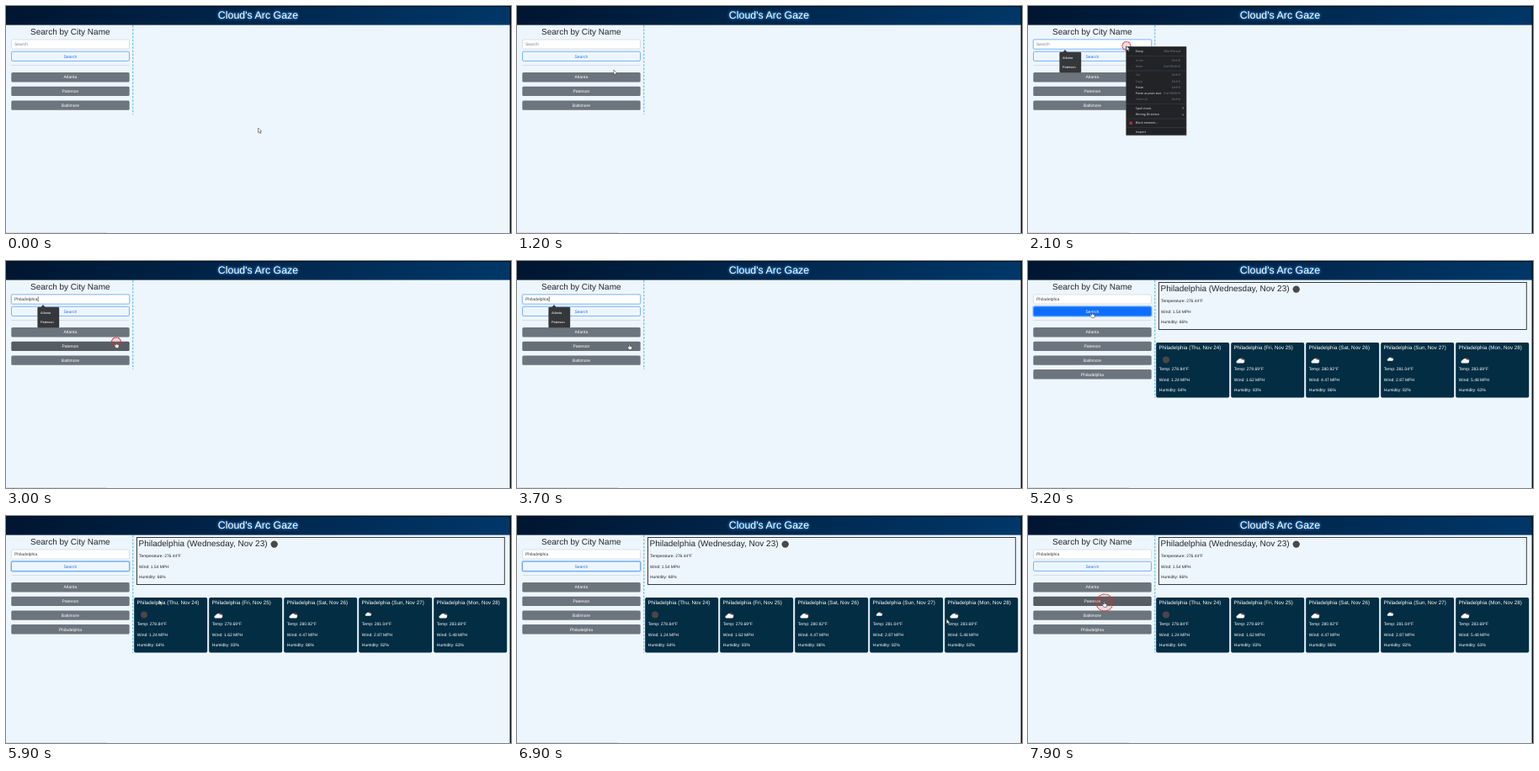
An HTML page for the animation above (8000 ms loop, 600 px wide and 270 px high).

```html
<!DOCTYPE html>
<html lang="en">
<head>
<meta charset="utf-8">
<title>City weather search</title>
<style>
html, body { margin: 0; width: 100%; height: 100%; overflow: hidden; background: #eef6fd; }
svg { display: block; width: 600px; height: 270px; }
text { font-family: "Liberation Sans", Arial, sans-serif; text-rendering: geometricPrecision; white-space: pre; }
#menu text { font-family: "Open Sans", "Noto Sans", sans-serif; }
#title { filter: drop-shadow(0 0 1.5px #2b8fd8) drop-shadow(0 0 1.5px #14589a); }
</style>
</head>
<body>
<svg id="stage" viewBox="0 0 600 270">
  <defs>
    <linearGradient id="bar" x2="1" y2=".04">
      <stop offset="0" stop-color="#001530"/>
      <stop offset=".5" stop-color="#00264c"/>
      <stop offset="1" stop-color="#003767"/>
    </linearGradient>
    <g id="cloud">
      <path d="M-1-1.4a2.4 2.4 0 0 1 4.6-.6a1.8 1.8 0 0 1 1 3.4h-5z" fill="#4a454e"/>
      <path d="M-3.4 3.2a1.6 1.6 0 0 1-.2-3.2a2.9 2.9 0 0 1 5.2-.8a2 2 0 0 1 1.6 4z" fill="#fff"/>
    </g>
  </defs>
</svg>
<script>
const LOOP = 8000, PASTE = 3000, LOADED = 4800;
const stage = document.getElementById('stage');

function add(parent, tag, attrs = {}, content) {
  const node = document.createElementNS('http://www.w3.org/2000/svg', tag);
  for (const k in attrs) node.setAttribute(k, attrs[k]);
  if (content !== undefined) node.textContent = content;
  return parent.appendChild(node);
}
const group = (id, parent = stage) => add(parent, 'g', { id });
const rect = (parent, x, y, width, height, fill, more) =>
  add(parent, 'rect', { x, y, width, height, fill, ...more });
// y is the middle of the capitals
const text = (parent, x, y, size, fill, str, anchor = 'start') =>
  add(parent, 'text', { x, y: y + size * .36, 'font-size': size, fill, 'text-anchor': anchor }, str);
const show = (node, on) => node.setAttribute('display', on ? 'inline' : 'none');

// Page
const page = group('page');
rect(page, 0, 0, 600, 270, '#eef6fd');
rect(page, 0, 0, 600, 22.6, 'url(#bar)');
rect(page, 0, 0, 600, 1, '#00101f');
rect(page, 598.6, 0, 1.4, 270, '#0b1118');
rect(page, 0, 269, 120, 1, '#d9dee3');
text(page, 299.5, 10.6, 12.4, '#fff', "Cloud's Arc Gaze", 'middle').id = 'title';
text(page, 76.3, 30.8, 10, '#212529', 'Search by City Name', 'middle');
const divider = add(page, 'path', { stroke: '#4fb5de', 'stroke-width': 1, 'stroke-dasharray': '2.6 1.6' });

const inputGlow = rect(page, 5.4, 38.9, 142.2, 13.2, '#bcd8fb', { rx: 2.4 });
const input = rect(page, 6.5, 40, 140, 11, '#fff', { rx: 1.5, 'stroke-width': .7 });
const query = text(page, 10, 45.3, 5, '#212529', '');
const caret = rect(page, 37.8, 42.5, .6, 6, '#111');

const buttonGlow = rect(page, 5.2, 52.9, 142.6, 13.8, '#a9cdfb', { rx: 2.6 });
const button = rect(page, 6.5, 54.2, 140, 11.2, '', { rx: 1.5, stroke: '#4a94f7', 'stroke-width': .7 });
const buttonText = text(page, 76.4, 59.7, 5, '', 'Search', 'middle');
rect(page, 6.5, 70.4, 140, .6, '#c6cdd4');

const cities = ['Atlanta', 'Paterson', 'Baltimore', 'Philadelphia'].map((name, i) => {
  const g = group('city' + i), y = 79 + i * 16.7;
  const box = rect(g, 6.3, y, 140.4, 11.4, '#6c757d', { rx: 1.5 });
  text(g, 76.4, y + 5.6, 5, '#fff', name, 'middle');
  return { g, box, y };
});

// Forecast
const results = group('results');
rect(results, 155.5, 25.5, 436.8, 56, 'none', { stroke: '#23282e', 'stroke-width': .9 });
text(results, 157.5, 32.6, 10, '#212529', 'Philadelphia (Wednesday, Nov 23)');
add(results, 'circle', { cx: 318.7, cy: 33.6, r: 4.2, fill: '#48494b' });
['Temperature: 276.44°F', 'Wind: 1.54 MPH', 'Humidity: 66%'].forEach((line, i) =>
  text(results, 158, 47.4 + i * 12.5, 4.9, '#212529', line));

[
  ['Thu, Nov 24', '278.84', '1.24', 64],
  ['Fri, Nov 25', '279.69', '1.62', 83],
  ['Sat, Nov 26', '280.92', '4.47', 86],
  ['Sun, Nov 27', '281.04', '2.87', 82],
  ['Mon, Nov 28', '283.69', '5.48', 63]
].forEach(([day, temp, wind, humidity], i) => {
  const x = 152.2 + i * 89, small = i == 3;
  rect(results, x, 97, 87, 65.6, '#022d43', { rx: 1.8 });
  text(results, x + 3.2, 103.2, 6.25, '#fff', `Philadelphia (${day})`);
  if (i) add(results, 'use', {
    href: '#cloud',
    transform: `translate(${x + 11.4} ${small ? 116.4 : 118.2}) scale(${small ? .75 : 1})`
  });
  else add(results, 'circle', { cx: x + 11.8, cy: 117.5, r: 4, fill: '#4c4548' });
  [`Temp: ${temp}°F`, `Wind: ${wind} MPH`, `Humidity: ${humidity}%`].forEach((line, j) =>
    text(results, x + 3.6, 128.3 + j * 12.6, 5, '#fff', line));
});

// Suggestions
const suggest = group('suggest');
add(suggest, 'path', { d: 'M41 55.5l3-3.5 3 3.5z', fill: '#35383b' });
rect(suggest, 37.4, 54.8, 25.8, 24.4, '#35383b', { rx: 1.2 });
text(suggest, 41, 61.6, 3.9, '#fff', 'Atlanta');
text(suggest, 41, 72.6, 3.9, '#fff', 'Paterson');

const ring = add(stage, 'circle', { fill: '#e0303028', stroke: '#d22f2f', 'stroke-width': 1.1, 'stroke-dasharray': '2 .5' });

// Context menu
const menu = group('menu');
rect(menu, 117.2, 49, 71.6, 105.6, '#00000030');
rect(menu, 116.6, 48.2, 71.4, 105.4, '#212327', { stroke: '#484b4f', 'stroke-width': .4 });
const pasteHover = rect(menu, 116.8, 92.8, 71, 7.2, '#3b3e43');
[
  [54, 'Emoji', 'Win+Period'],
  [64.4, 'Undo', 'Ctrl+Z', 1], [71.4, 'Redo', 'Ctrl+Shift+Z', 1],
  [82.2, 'Cut', 'Ctrl+X', 1], [89.4, 'Copy', 'Ctrl+C', 1], [96.4, 'Paste', 'Ctrl+V'],
  [103.6, 'Paste as plain text', 'Ctrl+Shift+V'], [110.7, 'Select all', 'Ctrl+A', 1],
  [121.3, 'Spell check', '›'], [128.4, 'Writing Direction', '›'],
  [139.2, 'Block element...', ''], [149.8, 'Inspect', '']
].forEach(([y, label, key, off]) => {
  text(menu, 127.8, y, 3.6, off ? '#75787c' : '#f1f1f1', label);
  text(menu, key == '›' ? 185 : 181, y, key == '›' ? 6 : 3.6, key == '›' ? '#eee' : '#8d9094', key, 'end');
});
[59.2, 76.8, 116, 133.8, 144.5].forEach(y => rect(menu, 116.8, y, 71, .4, '#494c50'));
add(menu, 'circle', { cx: 122.2, cy: 139.2, r: 2, fill: '#b52a2a' });

// Pointers, each with its hot spot at 0,0
const pointers = {
  arrow: ['M0 0V5.7L1.4 4.5 2.4 6.6 3.3 6.1 2.4 4.1H4.1Z', '#fff', '#222', .5],
  hand: ['M-.5 .5Q0-.4 .5 .5V2.6L2.8 3.2Q3.4 3.5 3.2 4.4L2.7 6.9H-.4L-2 4.6Q-2-.2-.5 4Z', '#fff', '#222', .5],
  beam: ['M-1-2.8H1M0-2.8V2.8M-1 2.8H1', 'none', '#333', .6]
};
for (const kind in pointers) {
  const [d, fill, stroke, width] = pointers[kind];
  pointers[kind] = add(stage, 'path', { d, fill, stroke, 'stroke-width': width, 'stroke-linejoin': 'round' });
}

// time, x, y
const route = [
  [0, 299.6, 145], [900, 112, 114], [1450, 117, 47.5], [2250, 117, 47.5],
  [2750, 131, 96.5], [3250, 131, 96.5], [3600, 133.5, 98.5], [3850, 133.5, 98.5],
  [4380, 76, 60.5], [5450, 76, 60.5], [5900, 182, 100], [6200, 540, 128],
  [6350, 516, 134], [7200, 508, 118], [7750, 90.5, 101.5], [LOOP, 90.5, 101.5]
];
const clicks = [[1500, 117, 47.5], [1950, 117, 47.5], [2950, 131, 96.5], [4550, 76, 60.5], [7700, 91, 103]];

const clamp = v => Math.max(0, Math.min(1, v));
const mix = (a, b, k) => a + (b - a) * k;
const blend = (a, b, k) => `rgb(${a.map((v, i) => Math.round(mix(v, b[i], k)))})`;

function pointerAt(t) {
  const i = Math.max(1, route.findIndex(p => p[0] >= t));
  const [t0, x0, y0] = route[i - 1], [t1, x1, y1] = route[i];
  const k = clamp((t - t0) / (t1 - t0)), e = k * k * (3 - 2 * k);
  return [mix(x0, x1, e), mix(y0, y1, e)];
}

function draw(t) {
  const [x, y] = pointerAt(t);
  const loaded = t >= LOADED, pasted = t >= PASTE;
  const menuOpen = t >= 2000 && t < PASTE;
  const focused = t >= 1500 && t < 4600;
  const within = (top, height) => x > 6 && x < 147 && y > top && y < top + height;
  const click = clicks.find(c => t >= c[0] && t < c[0] + 300);

  show(results, loaded);
  show(cities[3].g, loaded);
  divider.setAttribute('d', `M150.8 23V${loaded ? 163 : 129}`);

  show(inputGlow, focused);
  input.setAttribute('stroke', focused ? '#7db2fb' : '#ced4da');
  query.textContent = pasted ? 'Philadelphia' : 'Search';
  query.setAttribute('fill', pasted ? '#3a3e42' : '#7b838b');
  show(caret, pasted && focused && (t - 3400) % 1060 < 530);
  show(suggest, t >= 1550 && t < 3900);

  const hover = clamp((t - 4330) / 150) * (1 - clamp((t - 5530) / 150));
  button.setAttribute('fill', blend([238, 246, 253], [13, 110, 253], hover));
  buttonText.setAttribute('fill', blend([40, 120, 240], [255, 255, 255], hover));
  show(buttonGlow, t >= 4600 && t < 7700);

  let overCity = false;
  cities.forEach((c, i) => {
    const over = !menuOpen && (i < 3 || loaded) && within(c.y, 11.4);
    overCity = overCity || over;
    c.box.setAttribute('fill', !over ? '#6c757d' : click ? '#565e64' : '#666f76');
  });

  show(menu, menuOpen);
  show(pasteHover, y > 92.8 && y < 100);

  show(ring, click);
  if (click) {
    const k = (t - click[0]) / 300;
    ring.setAttribute('cx', click[1]);
    ring.setAttribute('cy', click[2]);
    ring.setAttribute('r', click[0] == 1950 ? mix(3, 7, k) : mix(4, 13, k));
    ring.setAttribute('opacity', 1 - k * k * .3);
  }

  const kind = menuOpen ? 'arrow'
    : overCity || within(54, 11.6) ? 'hand'
    : within(40, 11) ? 'beam' : 'arrow';
  for (const name in pointers) show(pointers[name], name == kind);
  pointers[kind].setAttribute('transform', `translate(${x} ${y})`);
}

const start = performance.now();
(function tick() {
  draw((performance.now() - start) % LOOP);
  requestAnimationFrame(tick);
})();
</script>
</body>
</html>
```
